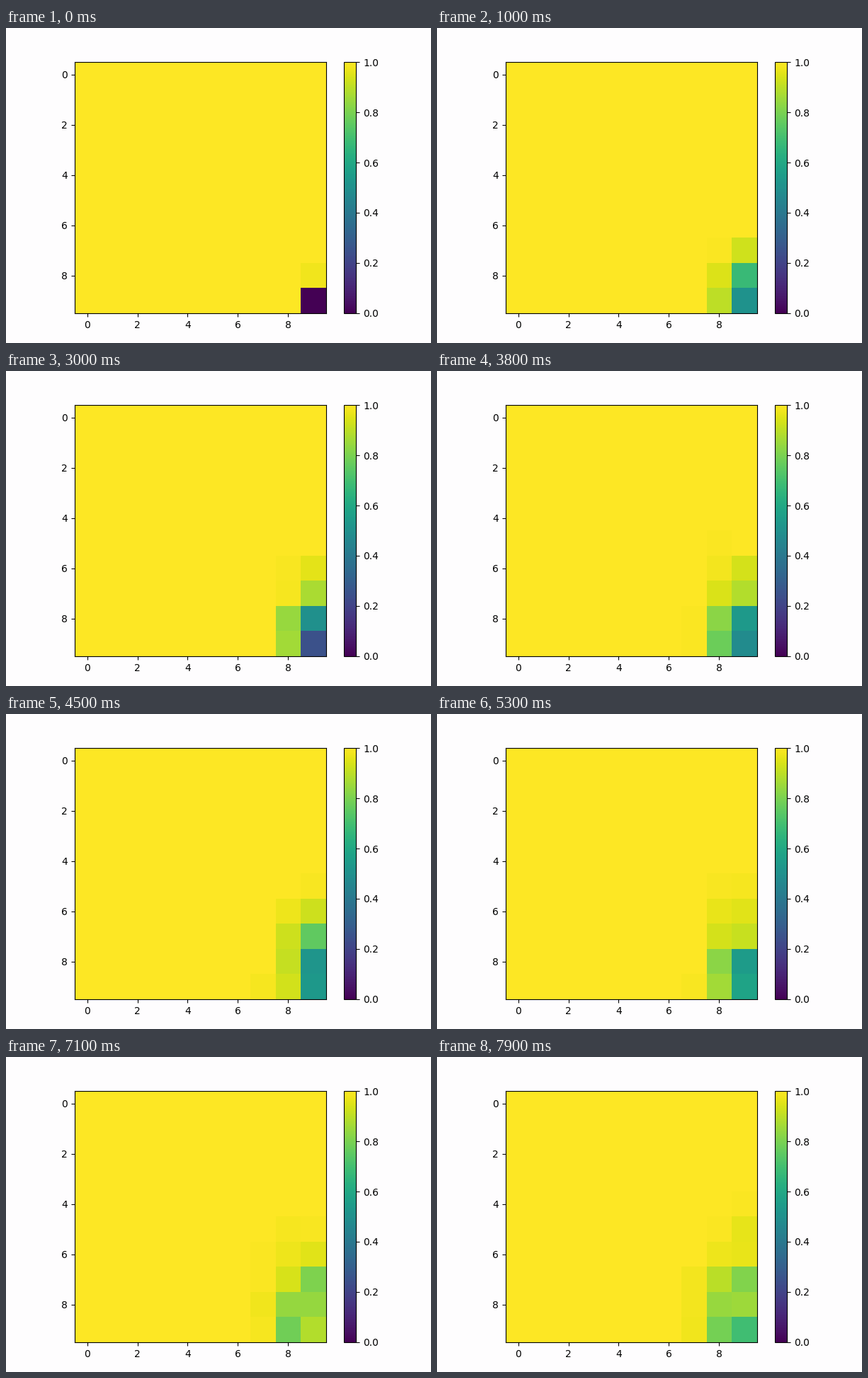
A matplotlib script that plays this animation: 600 by 445 pixels, repeating every 8000 ms.

```python
import numpy as np
import matplotlib.pyplot as plt
from matplotlib.animation import FuncAnimation

W, H, DPI = 600, 445, 100
FRAMES, INTERVAL = 80, 100
N = 10
LEFT, TOP, SIDE = 96.9, 48.2, 354.6


def spread(t):
    """Share lost by each cell: a bell around the corner that sinks and widens."""
    up, along = np.mgrid[N - 1:-1:-1, N - 1:-1:-1]
    reach = .36 + 1.5 * np.sqrt(t)
    bell = np.exp(-(up / reach) ** 2 / 2 - (along / (.5 * reach)) ** 2 / 2)
    return bell / (1 + 3 * t)


def simulate(seed=4):
    """Each step some cells jump to a new random weight, the rest hold theirs."""
    rng = np.random.default_rng(seed)
    weight = np.ones((N, N))
    states = []
    for step in range(FRAMES):
        states.append(np.clip(1 - weight * spread(step / (FRAMES - 1)), 0, 1))
        jump = rng.random((N, N)) < .2
        weight = np.where(jump, rng.uniform(.3, 1.7, (N, N)), weight)
    return states


def add_axes(left, top, width, height):
    return fig.add_axes([left / W, 1 - (top + height) / H,
                         width / W, height / H])


plt.rcParams.update({"font.family": "DejaVu Sans", "font.size": 10})
fig = plt.figure(figsize=(W / DPI, H / DPI), dpi=DPI, facecolor="#fefdfe")
ax = add_axes(LEFT, TOP, SIDE, SIDE)
cax = add_axes(476.7, TOP, SIDE / 20, SIDE)

states = simulate()
im = ax.imshow(states[0], cmap="viridis", vmin=0, vmax=1,
               interpolation="nearest", aspect="auto")
ax.set_xticks(range(0, N, 2))
ax.set_yticks(range(0, N, 2))
fig.colorbar(im, cax=cax)


def update(step):
    im.set_data(states[step])
    return [im]


anim = FuncAnimation(fig, update, frames=FRAMES, interval=INTERVAL,
                     repeat=True, repeat_delay=0)
plt.show()
```
